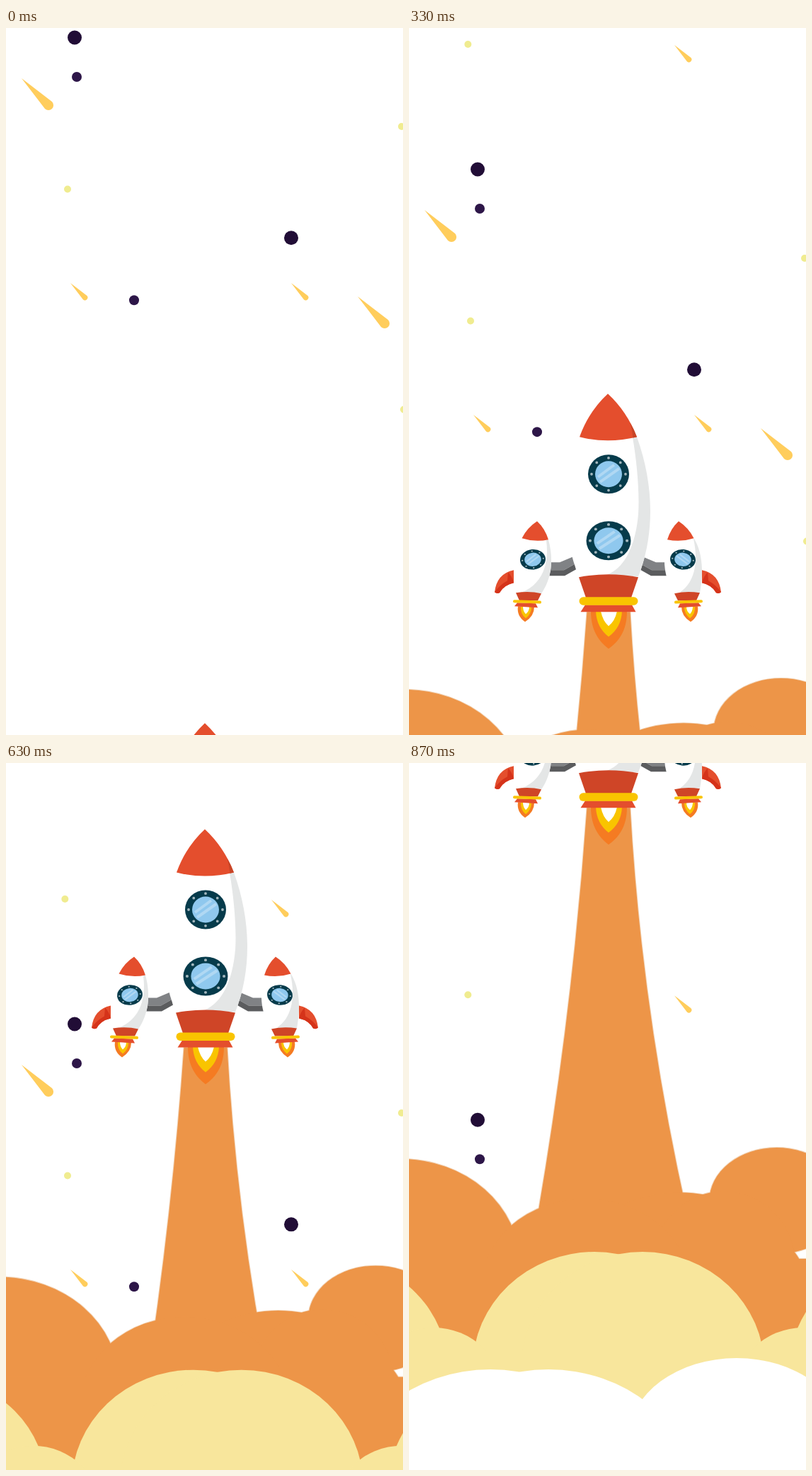
Animation, 561 px wide and 998 px high, one loop 900 ms. Source, as an HTML page:

```html
<!DOCTYPE html>
<html lang="en">
<head>
<meta charset="utf-8">
<title>Rocket launch</title>
<style>
  html, body { margin: 0; width: 100%; height: 100%; overflow: hidden; background: #fff; }
  svg { display: block; width: 100vw; height: 100vh; }
</style>
</head>
<body>
<svg viewBox="0 0 561 998">
  <defs>
    <path id="comet" fill="#ffcd5c" d="M0 0L43 33A7 7 0 1 1 33 43Z"/>

    <g id="window">
      <ellipse rx="29" ry="27.5" fill="#063b4b"/>
      <ellipse rx="24" ry="22.8" fill="none" stroke="#a3b6bd" stroke-width="3.8"
               stroke-linecap="round" pathLength="8" stroke-dasharray="0 1"/>
      <ellipse rx="19" ry="18.5" fill="#8fc8ee"/>
      <path d="M-15 4L8-13M-12 11L15-8" stroke="#b0d8f3" stroke-width="4"/>
    </g>

    <g id="arm">
      <path fill="#808285" d="M200 238H213L232 230 235 240 219 249H198Z"/>
      <path fill="#5b5c5e" d="M198 249H219L235 240 236 248 220 257H197Z"/>
    </g>

    <g id="hull">
      <path fill="#e44e2d" d="M148 249Q124 254 121 280Q124 283 128 281Q134 270 148 267Z"/>
      <path fill="#d5331a" d="M121 280Q128 270 139 264L140 252Q146 258 148 267Q134 270 128 281Q124 283 121 280Z"/>
      <path fill="#fff" d="M159.5 204C148 222 145 250 151 281L187 282C201 262 205 235 197 206Z"/>
    </g>

    <g id="trim">
      <path fill="#e44e2d" d="M181 180Q192 190 197 206Q178 210 159.5 204Q167 189 181 180Z"/>
      <path fill="#f57b22" d="M154 300Q152 314 164 322Q177 314 177 301Z"/>
      <path fill="#f9c400" d="M158 300Q157 311 165 317Q173 311 173 301Z"/>
      <path fill="#fff" d="M161 300Q161 307 165 311Q170 307 170 301Z"/>
      <path fill="#cf4527" d="M151 281Q170 278 187 282L182 292H156Z"/>
      <path fill="#e44e2d" d="M153 295L179 296 182 302 149 300Z"/>
      <path d="M149 293L185 294.3" stroke="#f9c400" stroke-width="4" stroke-linecap="round"/>
      <use href="#window" transform="translate(175 234) rotate(-6) scale(.62 .52)"/>
    </g>

    <g id="smoke">
      <ellipse cx="-12" cy="705" rx="168" ry="146"/>
      <ellipse cx="519.5" cy="618" rx="95" ry="75"/>
      <circle cx="382" cy="806.3" r="200"/>
      <circle cx="445" cy="704.5" r="100"/>
      <ellipse cx="250" cy="746" rx="150" ry="131"/>
      <path d="M-20 700H620V1500H-20Z"/>
    </g>
  </defs>

  <g id="sky">
    <g fill="#210d36"><circle cx="97" cy="13.5" r="10"/><circle cx="403" cy="296.3" r="10"/></g>
    <g fill="#2d1648"><circle cx="100" cy="69" r="7"/><circle cx="181" cy="384.2" r="7"/></g>
    <g fill="#f0ec90">
      <circle cx="87" cy="227.5" r="5"/><circle cx="559" cy="139" r="5"/>
      <circle cx="562" cy="538.5" r="5"/><circle cx="83.3" cy="-163" r="5"/>
    </g>
    <use href="#comet" x="22" y="71"/>
    <use href="#comet" x="497" y="379"/>
    <use href="#comet" transform="translate(91 360) scale(.54)"/>
    <use href="#comet" transform="translate(403 360) scale(.54)"/>
    <use href="#comet" transform="translate(375 -162) scale(.54)"/>
  </g>

  <g class="cloud"><use href="#smoke" fill="none" stroke="#f1d3b6" stroke-width="2"/></g>

  <g id="rocket">
    <path fill="#ed9548" stroke="#f1d3b6" stroke-width="2" paint-order="stroke"
          d="M251.5 308Q227 658 159 1008H424Q332 658 312.5 308Z"/>
    <use href="#arm"/>
    <use href="#arm" transform="matrix(-1 0 0 1 562 0)"/>
    <use href="#hull"/>
    <use href="#hull" transform="matrix(-1 0 0 1 562 0)"/>
    <g fill="#e4e6e6">
      <path d="M197 206C205 235 201 262 187 282L160 280C185 270 199 245 194 207Z"/>
      <path d="M402.5 204C414 222 417 250 411 281L383 280C402 268 410 240 402 205Z"/>
    </g>
    <use href="#trim"/>
    <use href="#trim" transform="matrix(-1 0 0 1 562 0)"/>

    <path fill="#fff" d="M241 61C216 130 216 200 240 258H324C347 200 347 130 322 61Z"/>
    <path fill="#e4e6e6" d="M322 61C347 130 347 200 324 258L281 255C305 245 320 215 324 170C326 140 322 95 316 62Z"/>
    <path fill="#e44e2d" d="M281 0Q308 25 322 61Q302 66 281 66Q260 66 241 61Q254 25 281 0Z"/>
    <path fill="#c84527" d="M312.5 41Q318 50 322 61L316.5 62.3Q315 50 312.5 41Z"/>
    <use href="#window" x="282" y="113.5"/>
    <use href="#window" transform="translate(282 207.5) scale(1.086 1)"/>

    <path fill="#f57b22" d="M257 307C257 335 269 350 282 360C296 350 308 335 308 307Z"/>
    <path fill="#f9c400" d="M264 307Q265 330 282 343Q300 330 301 307Z"/>
    <path fill="#fff" d="M271 307Q274 321 282 328Q291 321 294 307Z"/>
    <path fill="#cf4527" d="M240 259Q282 251 324 259L314 288H250Z"/>
    <path fill="#e44e2d" d="M249 298H315L320.5 308H242.5Z"/>
    <rect x="240.5" y="287" width="83" height="11.5" rx="5.7" fill="#f9c400"/>
  </g>

  <g class="cloud">
    <use href="#smoke" fill="#ed9548"/>
    <g fill="#f8e69c">
      <ellipse cx="262" cy="853" rx="172" ry="163"/>
      <ellipse cx="330" cy="853" rx="172" ry="163"/>
      <circle cx="-100" cy="857.5" r="155"/>
      <circle cx="692" cy="857.5" r="155"/>
      <circle cx="35" cy="897" r="100"/>
      <circle cx="557" cy="897" r="100"/>
      <path d="M-20 830H620V1500H-20Z"/>
    </g>
    <g fill="#fff">
      <ellipse cx="115" cy="1022" rx="200" ry="166"/>
      <ellipse cx="197" cy="1022" rx="200" ry="166"/>
      <ellipse cx="463" cy="952" rx="152" ry="112"/>
      <path d="M-20 920H620V1500H-20Z"/>
    </g>
  </g>
</svg>
<script>
  const LOOP = 900, STEP = 30, LAST = 870, CLOUD_START = 300;
  const sky = document.getElementById('sky');
  const rocket = document.getElementById('rocket');
  const clouds = document.querySelectorAll('.cloud');
  const move = (el, x, y) => el.setAttribute('transform', `translate(${x} ${y})`);

  function draw() {
    const t = Math.floor(performance.now() % LOOP / STEP) * STEP;
    move(sky, 0, 0.5635 * t);
    move(rocket, 0, 981.3 - 1.4092 * t);
    for (const cloud of clouds) {
      move(cloud, 0.0112 * (LAST - t), 0.6943 * (LAST - t));
      cloud.style.display = t < CLOUD_START ? 'none' : '';
    }
    requestAnimationFrame(draw);
  }
  draw();
</script>
</body>
</html>
```
